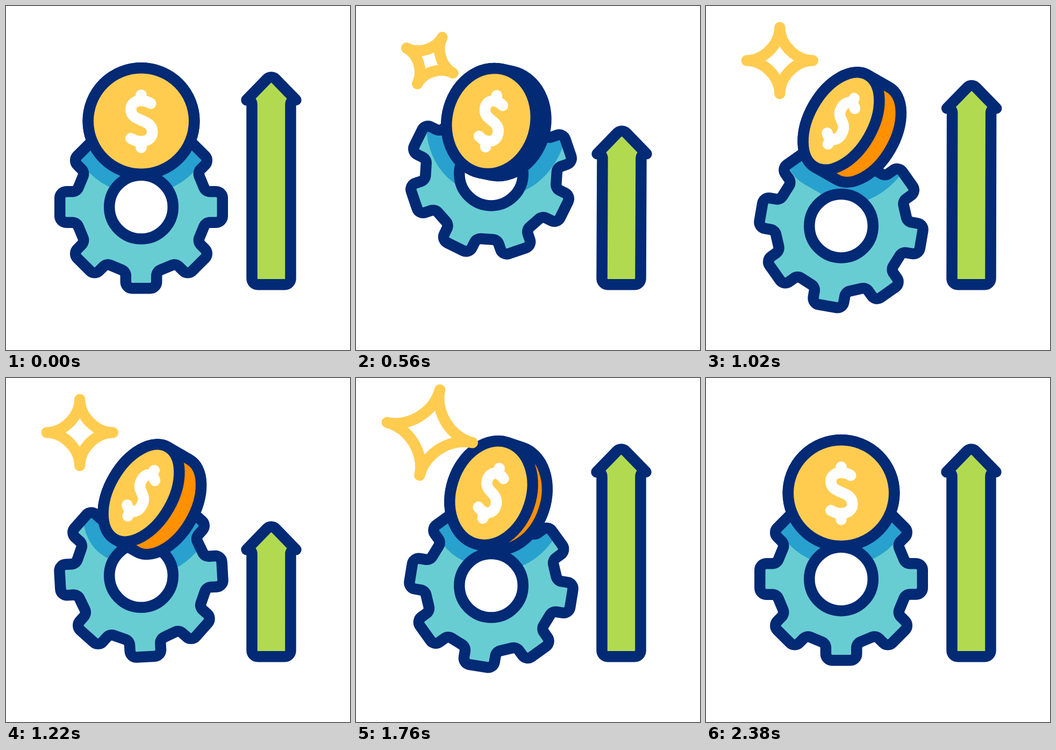
Recreate the animation shown at these times as an HTML page with a canvas. Size 640 by 640 pixels, loop 2.4 s.

```html
<!DOCTYPE html>
<html lang="en">
<head>
<meta charset="utf-8">
<title>Gear, coin and arrow</title>
<style>
  html, body { margin: 0; width: 100%; height: 100%; overflow: hidden; background: #fff; }
  canvas { display: block; width: 100vmin; height: 100vmin; }
</style>
</head>
<body>
<canvas id="stage" width="640" height="640"></canvas>
<script>
const ctx = document.getElementById('stage').getContext('2d');
const LOOP = 2400, LINE = 20.5, CX = 251.5, COIN_Y = 214, COIN_R = 98.75;
const NAVY = '#032a75', TEAL = '#68cdd2', BLUE = '#28a1ce', YELLOW = '#ffcc50',
      ORANGE = '#ff9000', GREEN = '#b1da50', WHITE = '#fff';

const rad = deg => deg * Math.PI / 180;

// Eased value at time t through [time, value] stops.
function ease(t, ...stops) {
  const i = stops.findIndex(([time]) => t < time);
  if (i < 1) return stops.at(i)[1];
  const [t0, a] = stops[i - 1], [t1, b] = stops[i];
  const u = (t - t0) / (t1 - t0);
  return a + (b - a) * u * u * (3 - 2 * u);
}

// Swing from rest through the peaks, each beat shorter than the last, and back to rest.
function swing(t, ...peaks) {
  let time = 550, beat = 427;
  const stops = peaks.map(peak => {
    const stop = [time, peak];
    time += beat;
    beat *= 0.86;
    return stop;
  });
  return ease(t, [0, 0], ...stops, [LOOP, 0]);
}

function paint(fill, stroke, width = LINE) {
  ctx.lineWidth = width;
  if (fill) { ctx.fillStyle = fill; ctx.fill(); }
  if (stroke) { ctx.strokeStyle = stroke; ctx.stroke(); }
}

function at(x, y, deg, draw) {
  ctx.save();
  ctx.translate(x, y);
  ctx.rotate(rad(deg));
  draw();
  ctx.restore();
}

// Closed polygon; each point is [x, y, corner radius].
function roundedPath(points) {
  const last = points.at(-1), first = points[0];
  ctx.beginPath();
  ctx.moveTo((last[0] + first[0]) / 2, (last[1] + first[1]) / 2);
  points.forEach(([x, y, r], i) => {
    const next = points[(i + 1) % points.length];
    ctx.arcTo(x, y, next[0], next[1], r);
  });
  ctx.closePath();
}

function gearPath() {
  const root = 120, tip = 151.25, half = 28.7, points = [];
  for (let deg = 0; deg < 360; deg += 45) {
    const c = Math.cos(rad(deg)), s = Math.sin(rad(deg));
    for (const [x, y] of [[root, -half], [tip, -half], [tip, half], [root, half]])
      points.push([x * c - y * s, x * s + y * c, 12]);
  }
  roundedPath(points);
}

// The front ellipse swept sideways by the coin's depth.
function coinBody(b, depth) {
  ctx.beginPath();
  ctx.ellipse(depth, 0, b, COIN_R, 0, -Math.PI / 2, Math.PI / 2);
  ctx.ellipse(0, 0, b, COIN_R, 0, Math.PI / 2, Math.PI * 1.5);
  ctx.closePath();
}

// Two copies of one hook, the lower turned upside down and slightly larger.
function dollarPath() {
  ctx.beginPath();
  for (const size of [0.96, -1.04]) {
    ctx.save();
    ctx.translate(0, -1.5);
    ctx.scale(size, size);
    ctx.moveTo(0, 0);
    ctx.bezierCurveTo(-11, -4.5, -20, -9, -20, -21);
    ctx.bezierCurveTo(-20, -32, -11, -38, 0, -38);
    ctx.bezierCurveTo(6, -38, 12, -36.5, 18.5, -32.5);
    ctx.moveTo(0, -38);
    ctx.lineTo(0, -49);
    ctx.restore();
  }
}

function drawGear(t, tilt) {
  const y = 374 + swing(t, -62, 37.5, -22, 22.5, -10);
  const turn = swing(t, -64, 58, -25, 16.5, -7);
  ctx.save();
  at(CX, y, turn, () => { gearPath(); paint(TEAL); });
  ctx.clip();
  at(CX, COIN_Y, 30 * tilt, () => {
    coinBody(COIN_R - 40 * tilt, 52 * tilt);
    paint(BLUE, BLUE, 75);
  });
  ctx.restore();
  at(CX, y, turn, () => { gearPath(); paint(null, NAVY); });
  ctx.beginPath();
  ctx.arc(CX, y, 59.25, 0, 2 * Math.PI);
  paint(WHITE, NAVY);
}

function drawCoin(tilt) {
  const b = COIN_R - 40 * tilt;
  at(CX, COIN_Y, 30 * tilt, () => {
    coinBody(b, 47 * tilt);
    paint(ORANGE, NAVY);
    ctx.beginPath();
    ctx.ellipse(0, 0, b, COIN_R, 0, 0, 2 * Math.PI);
    paint(YELLOW, NAVY);
    ctx.save();
    ctx.scale(b / COIN_R, 1);
    dollarPath();
    ctx.restore();
    paint(null, WHITE);
  });
}

function drawArrow(t) {
  const top = ease(t, [0, 122], [432, 300], [808, 14], [1242, 268], [1580, 57], [1755, 122]);
  const x = 493.5 + ease(t, [0, 0], [808, 1.3], [1242, 0]);
  const wing = top + 53, foot = 518.25;
  roundedPath([
    [529.5, foot, 11], [457.5, foot, 11],
    [x - 36, wing, 8], [x - 46, wing, 0],
    [x, top + 5.5, 11.5],
    [x + 46, wing, 0], [x + 36, wing, 8]
  ]);
  paint(GREEN, NAVY);
}

function drawStar(t) {
  const size = ease(t, [420, 0], [645, 1.16], [800, 1], [1625, 1], [1742, 1.35], [2000, 0]);
  if (size < 0.005) return;
  const turn = ease(t, [420, 90], [645, 0], [1630, 0], [2170, 90]);
  const tip = 61.5 * size, bend = 30 * size;
  at(137.25, 101.5, turn, () => {
    ctx.beginPath();
    ctx.moveTo(0, -tip);
    for (let i = 0; i < 4; i++) {
      ctx.bezierCurveTo(0, -bend, bend, 0, tip, 0);
      ctx.rotate(Math.PI / 2);
    }
    ctx.closePath();
    paint(null, YELLOW);
  });
}

function draw(now) {
  const t = now % LOOP;
  const tilt = ease(t, [160, 0], [1075, 1], [1390, 1], [2260, 0]);
  ctx.fillStyle = WHITE;
  ctx.fillRect(0, 0, 640, 640);
  ctx.lineCap = ctx.lineJoin = 'round';
  drawGear(t, tilt);
  drawCoin(tilt);
  drawArrow(t);
  drawStar(t);
  requestAnimationFrame(draw);
}
requestAnimationFrame(draw);
</script>
</body>
</html>
```
